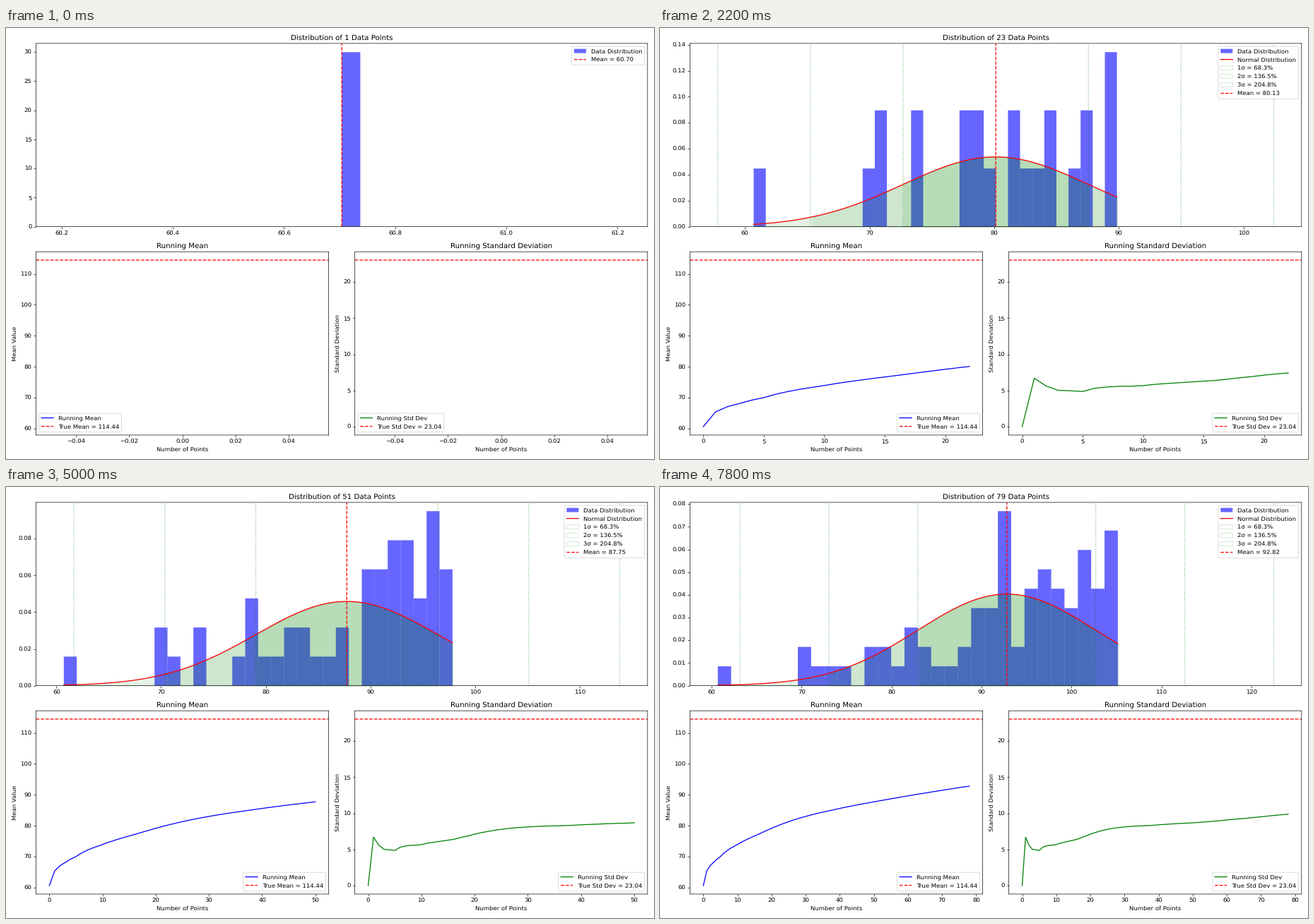
These frames come from a looping animation (917 px wide and 611 px high, 8000 ms). A matplotlib script:

```python
import numpy as np
import matplotlib.pyplot as plt
from matplotlib.animation import FuncAnimation

W, H = 917, 611
DPI = W / 15
FRAMES = 40

# two overlapping normal populations, revealed in rising order
rng = np.random.RandomState(42)
DATA = np.sort(np.concatenate([rng.normal(100, 15, 100),
                               rng.normal(130, 20, 100)]))
TRUE_MEAN, TRUE_STD = DATA.mean(), DATA.std(ddof=1)
COUNTS = range(1, 2 * FRAMES)
MEANS = [DATA[:n].mean() for n in COUNTS]
STDS = [DATA[:n].std(ddof=1) if n > 1 else 0.0 for n in COUNTS]

plt.rcParams.update({
    "font.family": "DejaVu Sans",
    "text.hinting": "none",
    "path.snap": False,
})
fig = plt.figure(figsize=(15, H / DPI), dpi=DPI)
grid = fig.add_gridspec(2, 2)
top = fig.add_subplot(grid[0, :])
left = fig.add_subplot(grid[1, 0])
right = fig.add_subplot(grid[1, 1])


def draw_distribution(n):
    data, mean, std = DATA[:n], MEANS[n - 1], STDS[n - 1]
    top.clear()
    top.hist(data, bins=30, density=True, alpha=0.6, color="b", snap=True,
             label="Data Distribution")
    if std > 0:
        x = np.linspace(data[0], data[-1], 100)
        pdf = np.exp(-((x - mean) / std) ** 2 / 2) / (std * np.sqrt(2 * np.pi))
        top.plot(x, pdf, "r-", label="Normal Distribution")
        for k in (1, 2, 3):
            lo, hi = mean - k * std, mean + k * std
            top.fill_between(x, pdf, where=(x >= lo) & (x <= hi),
                             color="green", alpha=0.1,
                             label=f"{k}σ = {68.27 * k:.1f}%")
            for edge in (lo, hi):
                top.axvline(edge, color="green", linestyle=":", alpha=0.5)
    top.axvline(mean, color="r", linestyle="--", label=f"Mean = {mean:.2f}")
    top.set_title(f"Distribution of {n} Data Points")
    legend = top.legend(loc="upper right")
    for swatch in legend.get_patches()[1:]:
        swatch.set(alpha=1, facecolor="white", edgecolor="#cfe7cf")


def draw_running(ax, values, color, short, full, ylabel, true):
    ax.clear()
    ax.plot(values, color=color, label=f"Running {short}")
    ax.axhline(true, color="r", linestyle="--", label=f"True {short} = {true:.2f}")
    ax.set_title(f"Running {full}")
    ax.set_xlabel("Number of Points")
    ax.set_ylabel(ylabel)
    ax.legend(loc="lower left" if len(values) == 1 else "lower right")


def update(i):
    n = 2 * i + 1
    draw_distribution(n)
    draw_running(left, MEANS[:n], "b", "Mean", "Mean", "Mean Value", TRUE_MEAN)
    draw_running(right, STDS[:n], "g", "Std Dev", "Standard Deviation",
                 "Standard Deviation", TRUE_STD)
    return []


update(0)
fig.tight_layout()
anim = FuncAnimation(fig, update, frames=FRAMES, init_func=lambda: [],
                     interval=200, repeat=True, repeat_delay=0)
plt.show()
```
